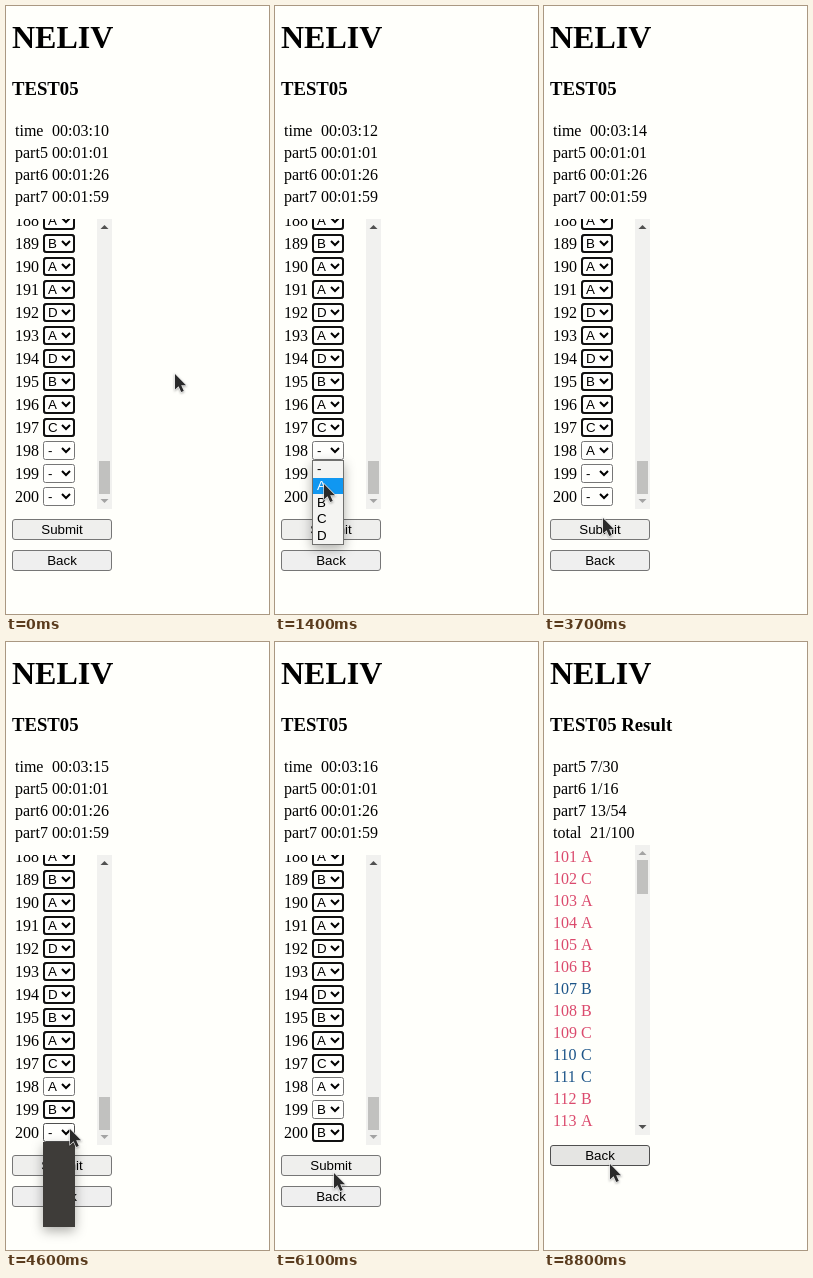
An HTML page for the animation above (8900 ms loop, 263 px wide and 608 px high).

```html
<!DOCTYPE html>
<html lang="en">
<head>
<meta charset="utf-8">
<title>NELIV</title>
<style>
  html, body { margin: 0; width: 100%; height: 100%; overflow: hidden; background: #fffffb; }
  svg { display: block; }
  text { font: 16px "Liberation Serif", "Times New Roman", serif; white-space: pre; }
  .h1 { font-size: 32px; font-weight: bold; }
  .h3 { font-size: 18.72px; font-weight: bold; }
  .ui { font: 13.333px "Liberation Sans", Arial, sans-serif; }
  .mid { text-anchor: middle; }
  .shadow { filter: drop-shadow(0 4px 6px rgba(0, 0, 0, .32)); }
</style>
</head>
<body>
<svg id="stage" width="263" height="608" viewBox="0 0 263 608"></svg>
<script>
const LOOP = 8900, STEP = 100, RESULT_AT = 7000;
const stage = document.getElementById('stage');

function el(parent, tag, attrs = {}, content) {
  const node = document.createElementNS('http://www.w3.org/2000/svg', tag);
  set(node, attrs);
  if (content !== undefined) node.textContent = content;
  return parent.appendChild(node);
}
function set(node, attrs) {
  for (const key in attrs) node.setAttribute(key, attrs[key]);
}
function show(node, on) {
  node.style.display = on ? '' : 'none';
}
const label = (parent, x, y, str, cls = '', fill = '#000') =>
  el(parent, 'text', { x, y, class: cls, fill }, str);
const box = (parent, x, y, width, height, fill) =>
  el(parent, 'rect', { x, y, width, height, fill });
const outlined = (parent, x, y, w, h, rx, fill, stroke) =>
  el(parent, 'rect', { x: x + .5, y: y + .5, width: w - 1, height: h - 1, rx, fill, stroke });

function table(parent, rows) {
  return rows.map(([name, value], i) => {
    label(parent, 9, 130 + 22 * i, name);
    return label(parent, 46, 130 + 22 * i, value);
  });
}

// Viewport whose children keep stage coordinates
function listView(parent, y) {
  return el(parent, 'svg', { x: 6, y, width: 100, height: 290, viewBox: `6 ${y} 100 290`, overflow: 'hidden' });
}

function scrollbar(parent, y, thumbY, thumbH, atTop) {
  const dark = '#505050', pale = '#a3a3a3';
  box(parent, 91, y, 15, 290, '#f1f1ef');
  box(parent, 93, thumbY, 11, thumbH, '#c1c1bf');
  el(parent, 'path', { d: `M94.5 ${y + 10}l4-4 4 4z`, fill: atTop ? pale : dark });
  el(parent, 'path', { d: `M94.5 ${y + 280}l4 4 4-4z`, fill: atTop ? dark : pale });
}

function button(parent, y, str) {
  const face = outlined(parent, 6, y, 100, 21, 2.5, '#efefef', '#767676');
  label(parent, 56, y + 15, str, 'ui mid');
  return face;
}
const FACES = {
  idle: { fill: '#efefed', stroke: '#767676' },
  hover: { fill: '#e5e5e3', stroke: '#4f4f4f' },
  active: { fill: '#f5f5f3', stroke: '#8d8d8d' }
};

// Quiz page
const quiz = el(stage, 'g');
label(quiz, 6, 42, 'NELIV', 'h1');
label(quiz, 6, 89, 'TEST05', 'h3');
const clock = table(quiz, [
  ['time', '00:03:10'], ['part5', '00:01:01'], ['part6', '00:01:26'], ['part7', '00:01:59']
])[0];

const quizList = listView(quiz, 213);
const rowY = n => 435 + 23 * (n - 198);
const selects = {};
[...'ABAADADBAC---'].forEach((answer, i) => {
  const n = 188 + i, y = rowY(n);
  label(quizList, 9, y + 15, n);
  const face = outlined(quizList, 37, y, 32, 19, 2, '#fffffd', '#767676');
  const value = label(quizList, 42, y + 14, answer, 'ui');
  el(quizList, 'path', { d: `M56 ${y + 7}l4 4 4-4`, fill: 'none', stroke: '#000', 'stroke-width': 2 });
  const ring = el(quizList, 'rect', {
    x: 38, y: y + 1, width: 30, height: 17, rx: 2.5, fill: 'none', stroke: '#101010', 'stroke-width': 2
  });
  selects[n] = { y, face, value, ring };
});
scrollbar(quizList, 213, 455, 33, false);
const submit = button(quiz, 513, 'Submit');
button(quiz, 544, 'Back');

// Drop-down menu, drawn at y = 0 and moved below its select
const OPTION_H = 16.6;
const popup = el(quiz, 'g');
const panel = outlined(popup, 37, 0, 32, 85, 0, '#f4f4f2', '#70706e');
panel.setAttribute('class', 'shadow');
const menu = el(popup, 'g');
const mark = box(menu, 38, 0, 30, 16, '#1097f1');
const options = [...'-ABCD'].map((str, i) =>
  label(menu, 42, Math.round(13.4 + OPTION_H * i), str, 'ui'));
const blank = box(popup, 37, 0, 32, 85, '#3e3c39');

// Result page
const result = el(stage, 'g');
label(result, 6, 42, 'NELIV', 'h1');
label(result, 6, 89, 'TEST05 Result', 'h3');
table(result, [['part5', '7/30'], ['part6', '1/16'], ['part7', '13/54'], ['total', '21/100']]);
const resultList = listView(result, 203);
const correct = [107, 110, 111];
[...'ACAAABBBCCCBA'].forEach((answer, i) => {
  const n = 101 + i, fill = correct.includes(n) ? '#1c5488' : '#db4a6d';
  label(resultList, 9, 220 + 22 * i, n, '', fill);
  label(resultList, 37, 220 + 22 * i, answer, '', fill);
});
scrollbar(resultList, 203, 218, 34, true);
const back = button(result, 503, 'Back');

const cursor = el(stage, 'path', {
  d: 'M0 0V15.5L3.6 12.2 6.2 18 8.8 16.9 6.2 11.2H11Z',
  fill: '#2a2a2a', stroke: '#f4f4f4', 'stroke-width': 1.2, 'paint-order': 'stroke',
  style: 'filter: drop-shadow(0 1px 1px rgba(0, 0, 0, .3))'
});

// Pointer stops: time, x, y
const path = [
  [100, 169, 368], [700, 60, 443], [1100, 60, 443], [1400, 49, 478], [1800, 49, 478],
  [1900, 50, 479], [2000, 50, 479], [2300, 61, 466], [3000, 61, 466], [3400, 59, 512],
  [3800, 59, 512], [4000, 64, 498], [4100, 64, 498], [4300, 64, 487], [4800, 64, 487],
  [4900, 62, 506], [5000, 62, 506], [5100, 56, 528], [5200, 57, 531], [5300, 57, 531],
  [5500, 59, 538], [6000, 59, 538], [6100, 59, 531], [6400, 65, 521], [8700, 65, 521],
  [8800, 66, 522]
];
function pointerAt(t) {
  const next = path.findIndex(p => p[0] >= t);
  if (next === 0) return path[0].slice(1);
  if (next < 0) return path[path.length - 1].slice(1);
  const [t0, x0, y0] = path[next - 1], [t1, x1, y1] = path[next];
  const k = (t - t0) / (t1 - t0), e = k * k * (3 - 2 * k);
  return [Math.round(x0 + (x1 - x0) * e), Math.round(y0 + (y1 - y0) * e)];
}

const picks = [
  { n: 198, open: 1000, ready: 1100, close: 1700, set: 1800, blur: 2700, answer: 'A' },
  { n: 199, open: 2700, ready: 2800, close: 3700, set: 3800, blur: 4900, answer: 'B' },
  { n: 200, open: 4600, ready: 4900, close: 5800, set: 5900, blur: 6700, answer: 'B' }
];

function drawQuiz(t, x, y) {
  const seconds = 10 + Math.floor((t + 800) / 1000);
  clock.textContent = `00:03:${seconds}`;

  const active = picks.find(p => t >= p.open && t < p.close);
  for (const p of picks) {
    const s = selects[p.n];
    s.value.textContent = t >= p.set ? p.answer : '-';
    show(s.ring, t >= p.set && t < p.blur);
  }
  for (const n in selects) {
    const s = selects[n];
    const over = x >= 37 && x < 69 && y >= s.y && y < s.y + 19 && (!active || active.n === +n);
    set(s.face, { stroke: over ? '#4f4f4f' : '#767676' });
  }

  show(popup, active);
  if (active) {
    const top = rowY(active.n) + 19, ready = t >= active.ready;
    const chosen = Math.min(4, Math.max(0, Math.floor((y - top - 1) / OPTION_H)));
    set(popup, { transform: `translate(0 ${top})` });
    show(menu, ready);
    show(blank, !ready);
    set(mark, { y: Math.round(1 + OPTION_H * chosen) });
    options.forEach((o, i) => set(o, { fill: i === chosen ? '#fff' : '#000' }));
  }

  const pressed = t >= 6700 && t < 6900;
  set(submit, FACES[pressed ? 'active' : t >= 6200 ? 'hover' : 'idle']);
}

function draw(time) {
  const t = Math.floor((time % LOOP) / STEP) * STEP;
  const [x, y] = pointerAt(t);
  const done = t >= RESULT_AT;
  show(quiz, !done);
  show(result, done);
  if (done) set(back, FACES[t >= 8800 ? 'hover' : 'idle']);
  else drawQuiz(t, x, y);
  set(cursor, { transform: `translate(${x} ${y})` });
}

const start = performance.now();
function tick() {
  draw(performance.now() - start);
  requestAnimationFrame(tick);
}
tick();
</script>
</body>
</html>
```
